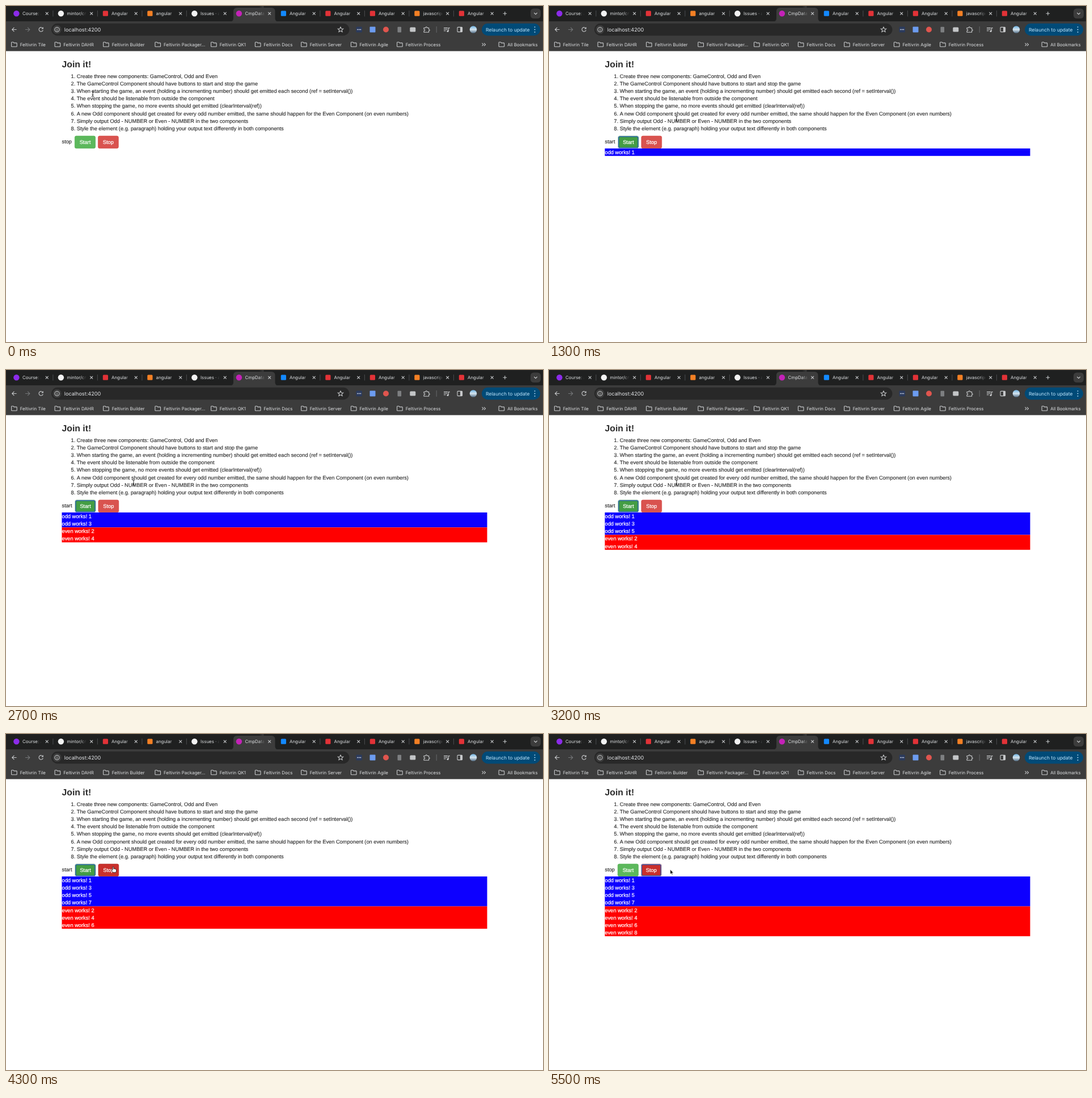
An HTML page for the animation above (5600 ms loop, 947x592 px).

```html
<!DOCTYPE html>
<html lang="en">
<head>
<meta charset="utf-8">
<title>Odd and even counter</title>
<style>
  html, body { margin: 0; width: 100%; height: 100%; overflow: hidden; background: #fff; }
  svg { display: block; }
  text { white-space: pre; text-rendering: geometricPrecision; }
  .ui text { font: 7.9px Inter, Roboto, sans-serif; fill: #dfe1e3; }
  .ui .url { font-size: 9.1px; fill: #e8eaed; }
  .ui .pill { font-size: 8.5px; fill: #c2e7ff; }
  .line { fill: none; stroke: #c7c9cb; stroke-width: 1.1; }
  .page text { font: 9.25px "Liberation Sans", Arial, sans-serif; fill: #2b2b2b; stroke: #2b2b2b; stroke-width: .14; }
  .page .title { font-size: 15.8px; font-weight: bold; stroke: none; }
  .page .white { fill: #fff; stroke: #fff; stroke-width: .25; }
  .end { text-anchor: end; }
  .mid { text-anchor: middle; }
  .ring { fill: none; }
</style>
</head>
<body>
<svg id="stage" width="947" height="592" viewBox="0 0 947 592">
  <defs>
    <linearGradient id="fadeStrip"><stop offset="0" stop-color="#1f2020" stop-opacity="0"/><stop offset="1" stop-color="#1f2020"/></linearGradient>
    <linearGradient id="fadeActive"><stop offset="0" stop-color="#3c3c3c" stop-opacity="0"/><stop offset="1" stop-color="#3c3c3c"/></linearGradient>
    <linearGradient id="photo" x2="0" y2="1"><stop offset="0" stop-color="#6fb4e4"/><stop offset=".5" stop-color="#d5e4ee"/><stop offset="1" stop-color="#55718a"/></linearGradient>
    <path id="folder" class="line" d="M.6 1.4Q.6.6 1.4.6H4L5.2 1.9H9.4Q10.2 1.9 10.2 2.7V7.8Q10.2 8.6 9.4 8.6H1.4Q.6 8.6.6 7.8Z"/>
  </defs>

  <g class="ui">
    <rect width="947" height="28" fill="#1f2020"/>
    <rect y="27" width="947" height="52.5" fill="#3c3c3c"/>
    <path d="M395 27.5Q401 27.5 401 21.5V9.5Q401 3 407.5 3H468Q474.5 3 474.5 9.5V21.5Q474.5 27.5 480.5 27.5Z" fill="#3c3c3c"/>
    <g id="tabs"></g>
    <path class="line" d="M876.5 13.2h6.6M879.8 9.9v6.6"/>
    <rect x="925" y="4.5" width="18" height="17.5" rx="5.5" fill="#3c3c3c"/>
    <path class="line" d="M931.3 12l2.7 2.7l2.7-2.7"/>

    <path class="line" d="M18.6 41.5H10.8M14.4 37.8L10.7 41.5L14.4 45.2"/>
    <path class="line" d="M34 41.5H41.8M38.2 37.8L41.9 41.5L38.2 45.2" style="stroke:#747678"/>
    <path class="line" d="M65 39.5A3.7 3.7 0 1 0 65.3 42.5M65.3 37.4V40H62.7"/>
    <rect x="80" y="30.8" width="525.5" height="21.4" rx="10.7" fill="#282828"/>
    <circle cx="90" cy="41.5" r="7.7" fill="#3c3c3c"/>
    <circle class="line" cx="90" cy="41.5" r="4"/>
    <path class="line" d="M90 41V43.7M90 39.1V40.1"/>
    <text class="url" x="102.8" y="44.7">localhost:4200</text>
    <path class="line" d="M590 37L591.4 40L594.7 40.3L592.2 42.4L593 45.7L590 43.9L587 45.7L587.8 42.4L585.3 40.3L588.6 40Z"/>
    <rect x="617.5" y="36.5" width="10.5" height="10" rx="1.5" fill="#2b3a5c"/>
    <path d="M619.3 41.5h1.6m1 0h1.6m1 0h1.6" stroke="#dfe6f5" stroke-width="1.4"/>
    <rect x="641.5" y="36.5" width="10" height="10" rx="1" fill="#6c9cf0"/>
    <circle cx="670" cy="41.5" r="5" fill="#e0554e"/>
    <rect x="690.5" y="36.8" width="6.6" height="9.6" rx="1" fill="#7d7f81"/>
    <rect x="712.3" y="37.6" width="10" height="8" rx="1.5" fill="#c3c5c7"/>
    <path class="line" d="M737 38.5H740Q740 36.8 741.3 36.8T742.6 38.5H745.6V41.2Q747.2 41.2 747.2 42.4T745.6 43.6V46.2H737V43.8Q738.8 43.6 738.8 42.4T737 41Z"/>
    <path d="M759.2 36V47" stroke="#67696b"/>
    <path class="line" d="M772 38.6H779M772 41.2H779M772 43.8H775.6M780.4 44.2V38.6H782.6"/>
    <circle cx="779" cy="44.4" r="1.6" fill="#c7c9cb"/>
    <rect class="line" x="796" y="37.4" width="8.6" height="8.2" rx="1"/>
    <rect x="801" y="37.4" width="3.6" height="8.2" fill="#c7c9cb"/>
    <circle cx="824" cy="41.5" r="6.3" fill="url(#photo)"/>
    <rect x="839" y="30.8" width="103" height="21.4" rx="10.7" fill="#004a77"/>
    <text class="pill" x="846" y="44.6">Relaunch to update</text>
    <path d="M932.5 37.1h.01m0 4.4h.01m0 4.4h.01" stroke="#c2e7ff" stroke-width="1.8" stroke-linecap="round"/>

    <g id="marks"></g>
    <path class="line" d="M839.5 65.4l2.5 2.5l-2.5 2.5M843 65.4l2.5 2.5l-2.5 2.5"/>
  </g>

  <g class="page">
    <text class="title" x="98.5" y="107.5">Join it!</text>
    <g id="list"></g>
    <text id="label" x="98.5" y="242.4"></text>
    <g id="buttons"></g>
    <rect id="oddBar" x="98.5" y="251" width="750" fill="#0d00ff"/>
    <rect id="evenBar" x="98.5" width="750" fill="#f00"/>
    <g id="rows"></g>
  </g>

  <g id="cursor">
    <path id="beam" d="M-2-4.8Q0-4.8 0-3.4Q0-4.8 2-4.8M0-3.4V3.4M-2 4.8Q0 4.8 0 3.4Q0 4.8 2 4.8M-1 1.6H1" fill="none" stroke="#222" stroke-width=".9" stroke-linecap="round"/>
    <path id="arrow" d="M0 0V8.2L1.9 6.5L3.1 9.3L4.4 8.7L3.2 6H5.7Z" fill="#111" stroke="#fff" stroke-width=".6"/>
    <path id="hand" d="M-.9 5V.6Q-.9-.3 0-.3T.9.6V3.5Q2.3 3 2.6 3.8Q3.8 3.4 4.1 4.2Q5.5 4 5.5 5.2V7Q5.5 8.4 4.6 9.9H-.4Q-1.2 8.4-2.8 6.6Q-3.4 5.6-2.5 5.2Q-1.8 5-.9 6Z" fill="#fff" stroke="#111" stroke-width=".8"/>
  </g>
</svg>

<script>
const LOOP = 5600, ROW = 13.16, TOP = 251;
const $ = id => document.getElementById(id);

function add(parent, tag, attrs, text) {
  const el = document.createElementNS('http://www.w3.org/2000/svg', tag);
  set(el, attrs);
  if (text) el.textContent = text;
  parent.appendChild(el);
  return el;
}
function set(el, attrs) { for (const k in attrs) el.setAttribute(k, attrs[k]); }
function show(el, on) { el.style.display = on ? '' : 'none'; }

// Tab strip: title, icon colour, round icon or square
const tabs = [
  ['Course: A', '#8c2bea', 1], ['mintor/cm', '#f2f2f2', 1], ['Angular', '#e23237', 0],
  ['angular', '#f48024', 0], ['Issues · a', '#f2f2f2', 1], ['CmpDatab', '#c422b8', 1],
  ['Angular', '#1389fd', 0], ['Angular', '#e23237', 0], ['Angular', '#e23237', 0],
  ['javascript', '#f48024', 0], ['Angular', '#e23237', 0]
];
tabs.forEach(([title, color, round], i) => {
  const x = 18.4 + i * 78.5, g = $('tabs'), active = i === 5;
  if (round) add(g, 'circle', { cx: x, cy: 13.2, r: 5.2, fill: color });
  else add(g, 'rect', { x: x - 4.6, y: 8.6, width: 9.2, height: 9.2, rx: 1.5, fill: color });
  const box = add(g, 'svg', { x: x + 10.6, y: 0, width: 33, height: 26 });
  add(box, 'text', { x: 0, y: 16 }, title);
  add(box, 'rect', { x: 25, width: 8.2, height: 26, fill: `url(#${active ? 'fadeActive' : 'fadeStrip'})` });
  add(g, 'path', { class: 'line', d: `M${x + 51.4} 10.8l4.8 4.8m0-4.8l-4.8 4.8` });
  if (i !== 4 && !active && i < 10)
    add(g, 'path', { d: `M${x + 64.5} 8v10.5`, stroke: '#4b4d4f' });
});

const marks = [
  [9, 'Feltivrin Tile'], [85.5, 'Feltivrin DAHR'], [171, 'Feltivrin Builder'],
  [262.3, 'Feltivrin Packager...'], [361, 'Feltivrin QK1'], [438.8, 'Feltivrin Docs'],
  [520, 'Feltivrin Server'], [607.8, 'Feltivrin Agile'], [689, 'Feltivrin Process'],
  [868.5, 'All Bookmarks']
];
marks.forEach(([x, name]) => {
  add($('marks'), 'use', { href: '#folder', x, y: 63.2 });
  add($('marks'), 'text', { x: x + 15.7, y: 70.7 }, name);
});

[
  'Create three new components: GameControl, Odd and Even',
  'The GameControl Component should have buttons to start and stop the game',
  'When starting the game, an event (holding a incrementing number) should get emitted each second (ref = setInterval())',
  'The event should be listenable from outside the component',
  'When stopping the game, no more events should get emitted (clearInterval(ref))',
  'A new Odd component should get created for every odd number emitted, the same should happen for the Even Component (on even numbers)',
  'Simply output Odd - NUMBER or Even - NUMBER in the two components',
  'Style the element (e.g. paragraph) holding your output text differently in both components'
].forEach((line, i) => {
  const y = 126.8 + i * ROW;
  add($('list'), 'text', { x: 122.3, y, class: 'end' }, `${i + 1}.`);
  add($('list'), 'text', { x: 124.8, y }, line);
});

function makeButton(x, width, name, normal, dark) {
  const g = add($('buttons'), 'g', {});
  const inset = (d, rx) => ({ x: x + d, y: 228.7 + d, width: width - 2 * d, height: 22.3 - 2 * d, rx });
  const face = add(g, 'rect', { ...inset(.33, 2.6), 'stroke-width': .66 });
  const ring = add(g, 'g', { class: 'ring' });
  add(ring, 'rect', { ...inset(.4, 2.6), stroke: '#fff', 'stroke-width': .8 });
  add(ring, 'rect', { ...inset(1.4, 2), stroke: '#1c56b4', 'stroke-width': 1.2 });
  add(g, 'text', { x: x + width / 2, y: 243.2, class: 'white mid' }, name);
  return (hot, focus) => {
    const [fill, stroke] = hot || focus ? dark : normal;
    set(face, { fill, stroke });
    show(ring, focus);
  };
}
const startButton = makeButton(121, 36.9, 'Start', ['#5cb85c', '#4cae4c'], ['#449d44', '#398439']);
const stopButton = makeButton(162.1, 36.5, 'Stop', ['#d9534f', '#d43f3a'], ['#c9302c', '#ac2925']);

const rows = Array.from({ length: 8 }, (_, i) =>
  add($('rows'), 'text', { x: 98.5, class: 'white' }, `${i % 2 ? 'even' : 'odd'} works! ${i + 1}`));

// Pointer stops: time, x, y, shape
const path = [
  [0, 153, 155, 'beam'], [100, 152, 164, 'beam'], [200, 149, 183, 'beam'], [300, 146, 205, 'beam'],
  [400, 143, 224, 'arrow'], [500, 141, 236, 'hand'], [600, 140, 239, 'hand'],
  [800, 146, 236, 'hand'], [900, 169, 223, 'arrow'], [1000, 196, 210, 'beam'], [1100, 216, 202, 'beam'],
  [1200, 225, 198.5, 'beam'], [3500, 222, 202, 'beam'], [3600, 213, 210, 'beam'], [3700, 205, 217, 'beam'],
  [3900, 198, 221, 'arrow'], [4000, 195.6, 222.5, 'arrow'], [4200, 193, 227, 'arrow'],
  [4300, 189, 234, 'hand'], [4400, 186, 238, 'hand'], [4500, 185.2, 239.2, 'hand'],
  [5400, 202, 239, 'arrow'], [5500, 213.8, 238.8, 'arrow']
];

function draw(t) {
  const count = Math.max(0, Math.min(8, Math.floor((t - 1200) / 500) + 1));
  const odds = Math.ceil(count / 2), evens = count - odds;
  set($('oddBar'), { height: odds * ROW });
  set($('evenBar'), { y: TOP + odds * ROW, height: evens * ROW });
  rows.forEach((row, i) => {
    const slot = (i >> 1) + (i % 2 ? odds : 0);
    set(row, { y: TOP + 9.9 + slot * ROW });
    show(row, i < count);
  });

  const running = t >= 700 && t < 4900;
  $('label').textContent = running ? 'start' : 'stop';
  set($('buttons'), { transform: `translate(${running ? .5 : 0})` });
  startButton(t >= 500 && t < 700, running);
  stopButton(t >= 4300, t >= 4900);

  const [, x, y, shape] = path.filter(p => p[0] <= t).pop();
  set($('cursor'), { transform: `translate(${x} ${y})` });
  for (const id of ['beam', 'arrow', 'hand']) show($(id), id === shape);
}

function tick() {
  draw(performance.now() % LOOP);
  requestAnimationFrame(tick);
}
tick();
</script>
</body>
</html>
```
